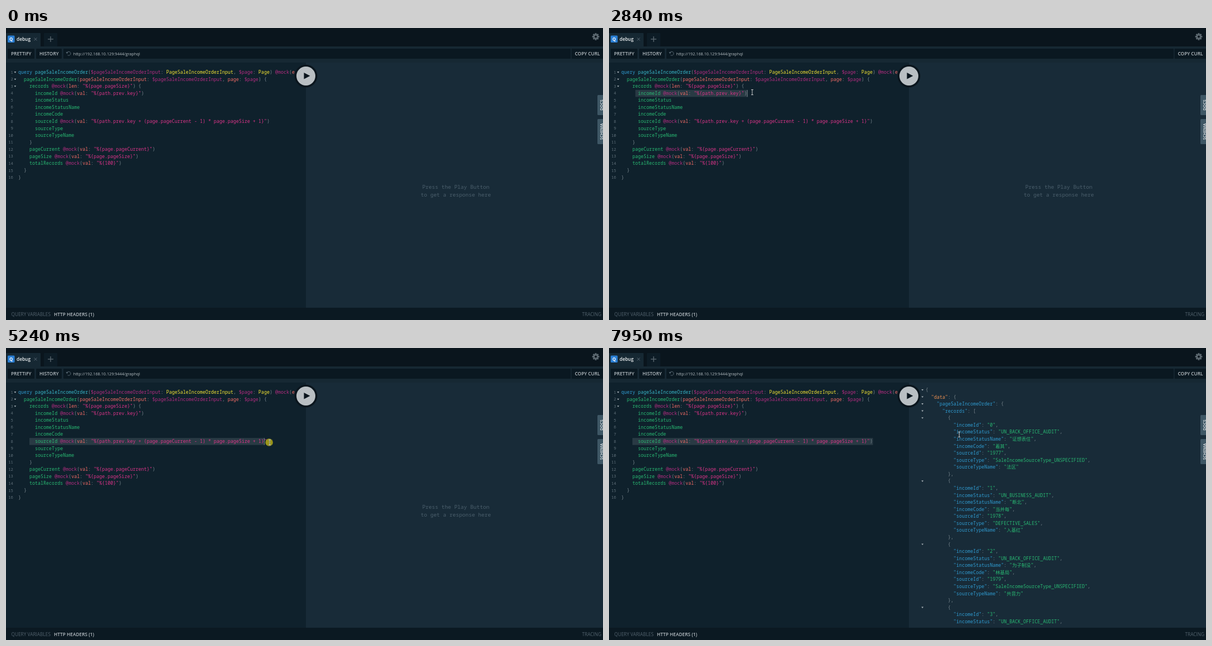
Recreate the animation shown at these times as an HTML page with a canvas. Size 1071 by 523 pixels, loop 8 s.

```html
<!DOCTYPE html>
<html lang="en">
<head>
<meta charset="utf-8">
<title>Query playground</title>
<style>
html, body { margin: 0; width: 100%; height: 100%; overflow: hidden; background: #0a151d; }
canvas { display: block; width: 1071px; height: 523px; }
</style>
</head>
<body>
<canvas id="stage" width="1071" height="523"></canvas>
<script>
const ctx = document.getElementById('stage').getContext('2d');
const LOOP = 8000, STEP = 67.9, START = 130;
const ROW = 12.57, COL = 5.01, CODE_SIZE = 8.35, UI_SIZE = 8.3;
const CLICK_PLAY = 6190, LOADING = 6660, RESPONSE = 6860;
const MONO = '"Noto Sans Mono", "Noto Sans CJK SC", "Noto Sans CJK", monospace';
const SANS = '"Open Sans", sans-serif';
const C = {
  bar: '#0a151d', nav: '#162833', button: '#0a1821', editor: '#0f212c', result: '#182b38',
  label: '#b8c0c5', dim: '#53636e', icon: '#5b676f', hint: '#4b5f6c', select: '#293a44',
  punct: '#75838b', blue: '#2f9bd0', cyan: '#38b5c8', green: '#29b973', pink: '#dc3489',
  variable: '#b32d80', arg: '#f26b66', type: '#f4e534', orange: '#ee9152'
};

const queryLines = `query pageSaleIncomeOrder($pageSaleIncomeOrderInput: PageSaleIncomeOrderInput, $page: Page) @mock(e
  pageSaleIncomeOrder(pageSaleIncomeOrderInput: $pageSaleIncomeOrderInput, page: $page) {
    records @mock(len: "%{page.pageSize}") {
      incomeId @mock(val: "%{path.prev.key}")
      incomeStatus
      incomeStatusName
      incomeCode
      sourceId @mock(val: "%{path.prev.key + (page.pageCurrent - 1) * page.pageSize + 1}")
      sourceType
      sourceTypeName
    }
    pageCurrent @mock(val: "%{page.pageCurrent}")
    pageSize @mock(val: "%{page.pageSize}")
    totalRecords @mock(val: "%{100}")
  }
}`.split('\n');

const BACK = 'UN_BACK_OFFICE_AUDIT', PLAIN = 'SaleIncomeSourceType_UNSPECIFIED';
const records = [
  [BACK, '证想表住', '着其', PLAIN, '法区'],
  ['UN_BUSINESS_AUDIT', '断北', '当并每', 'DEFECTIVE_SALES', '入基红'],
  [BACK, '为子制没', '林基局', PLAIN, '共音力'],
  [BACK, '', '', PLAIN, '']
].map(([incomeStatus, incomeStatusName, incomeCode, sourceType, sourceTypeName], i) => ({
  incomeId: `${i}`, incomeStatus, incomeStatusName, incomeCode,
  sourceId: `${1977 + i}`, sourceType, sourceTypeName
}));
const resultLines = JSON.stringify({ data: { pageSaleIncomeOrder: { records } } }, null, 2)
  .split('\n').slice(0, 34);

const queryRules = [
  [/"[^"]*"/y, C.pink], [/\$\w+/y, C.variable], [/@\w+/y, C.variable],
  [/\w+(?=:)|e$/y, C.arg], [/query\b/y, C.blue], [/(?<=query )\w+/y, C.cyan],
  [/[A-Z]\w*/y, C.type], [/\w+/y, C.green], [/\s+|./y, C.punct]
];
const resultRules = [
  [/"data"/y, C.orange], [/"\w+"(?=:)/y, C.blue], [/"[^"]*"/y, C.green], [/\s+|./y, C.punct]
];

function tokenize(line, rules) {
  const tokens = [];
  for (let pos = 0; pos < line.length;) {
    for (const [pattern, color] of rules) {
      pattern.lastIndex = pos;
      const match = pattern.exec(line);
      if (!match) continue;
      tokens.push([match[0], color]);
      pos += match[0].length;
      break;
    }
  }
  return tokens;
}
const queryTokens = queryLines.map(line => tokenize(line, queryRules));
const resultTokens = resultLines.map(line => tokenize(line, resultRules));

function rect(x, y, w, h, color) {
  ctx.fillStyle = color;
  ctx.fillRect(x, y, w, h);
}
function box(x, y, w, h, color, radius = 1) {
  ctx.fillStyle = color;
  ctx.beginPath();
  ctx.roundRect(x, y, w, h, radius);
  ctx.fill();
}
function disc(x, y, r, color) {
  ctx.fillStyle = color;
  ctx.beginPath();
  ctx.arc(x, y, r, 0, Math.PI * 2);
  ctx.fill();
}
// An isosceles triangle around a point; angle 0 points right.
function triangle(x, y, length, height, color, angle = 0) {
  ctx.save();
  ctx.translate(x, y);
  ctx.rotate(angle);
  ctx.fillStyle = color;
  ctx.beginPath();
  ctx.moveTo(length / 2, 0);
  ctx.lineTo(-length / 2, height / 2);
  ctx.lineTo(-length / 2, -height / 2);
  ctx.fill();
  ctx.restore();
}
function cross(x, y, size, color, width, angle = 0) {
  ctx.save();
  ctx.translate(x, y);
  ctx.rotate(angle);
  rect(-size / 2, -width / 2, size, width, color);
  rect(-width / 2, -size / 2, width, size, color);
  ctx.restore();
}

// Laid out at ten times the size, so small type keeps fractional advances.
function text(s, x, y, color, size = UI_SIZE, { family = SANS, weight = 400, align = 'left' } = {}) {
  ctx.save();
  ctx.translate(x, y);
  ctx.scale(0.1, 0.1);
  ctx.font = `${weight} ${size * 10}px ${family}`;
  ctx.textAlign = align;
  ctx.fillStyle = color;
  ctx.fillText(s, 0, 0);
  const width = ctx.measureText(s).width / 10;
  ctx.restore();
  return width;
}
function code(lines, x, y) {
  lines.forEach((tokens, row) => {
    let at = x;
    for (const [s, color] of tokens)
      at += text(s, at, y + row * ROW, color, CODE_SIZE, { family: MONO });
  });
}
function folds(lines, x, y) {
  lines.forEach((line, row) => {
    if (/[{[(e]$/.test(line)) triangle(x, y + row * ROW, 2.6, 3.8, '#a5afb5', Math.PI / 2);
  });
}

function button(label, x, w) {
  box(x, 37, w, 18, C.button);
  text(label, x + 6, 49, C.label, UI_SIZE, { weight: 600 });
}
function gear(x, y) {
  for (let i = 0; i < 4; i++) cross(x, y, 12.4, C.icon, 2.6, i * Math.PI / 4);
  disc(x, y, 4.7, C.icon);
  disc(x, y, 2, C.bar);
}
function sideTab(label, y, h) {
  box(1061, y, 12, h, '#3e5765', 1.5);
  ctx.save();
  ctx.translate(1071, y + h / 2);
  ctx.rotate(-Math.PI / 2);
  text(label, 0, 0, '#e4e9eb', 7.2, { weight: 600, align: 'center' });
  ctx.restore();
}

function drawChrome() {
  rect(0, 0, 1071, 523, C.bar);
  box(0, 9, 62, 26, C.nav);
  box(68, 9, 24, 24, '#0d1c26');
  rect(0, 33, 1071, 29, C.nav);
  box(3, 13.5, 12.5, 12.5, '#2a7ed3', 1.5);
  text('Q', 9.2, 22.6, '#fff', 8, { weight: 700, align: 'center' });
  text('debug', 19, 23, '#f0f3f4', UI_SIZE, { weight: 600 });
  cross(53, 20, 7, C.dim, 0.9, Math.PI / 4);
  cross(80, 20, 10, C.icon, 1.4);
  gear(1058, 15.5);

  button('PRETTIFY', 3, 48);
  button('HISTORY', 54, 46);
  button('', 103, 910);
  button('COPY CURL', 1014.5, 60);
  text('http://192.168.10.129:9444/graphql', 120.7, 48.7, '#b5bec3', 7.25);
  ctx.strokeStyle = C.dim;
  ctx.lineWidth = 1;
  ctx.beginPath();
  ctx.arc(112.5, 45.7, 3.5, -2.7, 2.2);
  ctx.stroke();
  triangle(109.5, 44.7, 3.5, 4, C.dim, Math.PI / 2);

  rect(0, 62, 538, 439, C.editor);
  rect(538, 62, 533, 439, C.result);
  rect(0, 501, 1071, 22, '#0b1922');
  text('QUERY VARIABLES', 9.5, 516, C.dim);
  text('HTTP HEADERS (1)', 86, 516, C.label, UI_SIZE, { weight: 600 });
  text('TRACING', 1033.5, 516, C.dim);
}

function drawPlay(loading) {
  disc(538, 86, 20.5, C.bar);
  disc(538, 86, 17, '#b9bfc3');
  if (loading) rect(533, 80.5, 10.5, 10.5, C.bar);
  else triangle(540, 85.7, 11, 11.4, C.bar);
}

// Each move eases from wherever the pointer rests to a new place.
const moves = [
  { from: START, to: 950, x: 22, y: 113 },
  { from: 1150, to: 1450, x: 50, y: 115 },
  { from: 1480, to: 2510, x: 257, y: 115 },
  { from: 2840, to: 3520, x: 41, y: 163 },
  { from: 4000, to: 5010, x: 465, y: 169 },
  { from: 5010, to: 5570, x: 490, y: 169 },
  { from: 5640, to: 5990, x: 541, y: 98 },
  { from: RESPONSE, to: 7600, x: 488, y: 128 },
  { from: 7670, to: 7950, x: 629, y: 155 }
];
const smooth = k => k * k * (3 - 2 * k);

function pointerAt(time) {
  const t = START + Math.floor((time - START) / STEP + 0.1) * STEP;
  let x = 963, y = 502;
  for (const move of moves) {
    const k = smooth(Math.min(1, Math.max(0, (t - move.from) / (move.to - move.from))));
    x += (move.x - x) * k;
    y += (move.y - y) * k;
  }
  return { x, y };
}

function drawBeam(x, y) {
  for (const [color, grow] of [['rgba(0,0,0,.4)', 0.5], ['#cbd2d5', 0]]) {
    const w = 1 + grow;
    rect(x - w / 2, y - 4.5, w, 9, color);
    for (const end of [-4.6, 4.6]) rect(x - 2 - grow, y + end - w / 2, 4 + 2 * grow, w, color);
  }
}
function drawHand(x, y) {
  for (const [color, grow] of [['#111', 0.8], ['#fff', 0]]) {
    const part = (dx, dy, w, h) =>
      box(x + dx - grow, y + dy - grow, w + 2 * grow, h + 2 * grow, color, 1 + grow);
    part(-2.5, -5.5, 2, 9);
    part(-2.5, -1.5, 6.3, 7.5);
    part(-4.5, 0.5, 3, 3);
  }
}
function drawPointer({ x, y }) {
  const overPlay = Math.hypot(x - 538, y - 86) < 18;
  (overPlay ? drawHand : drawBeam)(x, y);
}

const within = (t, from, to) => t >= from && t < to;

const drags = [
  { press: 1480, release: 2720, clear: 4000, blur: 3050, row: 3, start: 47.3, end: 247.7 },
  { press: 4000, release: 5640, clear: LOOP, blur: LOADING, row: 7, start: 42, end: 473.5 }
];
function drawSelection(t, pointer) {
  const drag = drags.find(d => within(t, d.press, d.clear));
  if (!drag) return;
  const { press, release, blur, row, start, end } = drag;
  const reach = start + Math.round((pointer.x - 9 - start) / COL) * COL;
  const edge = t < release ? Math.min(end, Math.max(start, reach)) : end;
  const top = 73.2 + row * ROW;
  rect(start, top, edge - start, 12.5, C.select);
  const blinkedOff = within(t, 5640, 6140);
  if (t < blur && !blinkedOff) rect(edge, top, 0.8, 12.5, '#99a3a8');
}

function drawQuery() {
  queryLines.forEach((_, i) =>
    text(i + 1, 12.8, 81.6 + i * ROW, '#60707a', 7.2, { family: MONO, align: 'right' }));
  folds(queryLines.slice(0, 3), 16.4, 79.4);
  code(queryTokens, 22, 82);
}

function drawResult(t) {
  if (t >= RESPONSE) {
    folds(resultLines, 562.3, 75.2);
    code(resultTokens, 568, 78);
    return;
  }
  ['Press the Play Button', 'to get a response here'].forEach((line, i) =>
    text(line, 807, 288.3 + i * 13.3, C.hint, 9.55, { family: MONO, align: 'center' }));
}

function draw(t) {
  const pointer = pointerAt(t);
  drawChrome();
  drawSelection(t, pointer);
  drawQuery();
  drawResult(t);
  drawPlay(within(t, LOADING, RESPONSE));
  sideTab('DOCS', 120, 36);
  sideTab('SCHEMA', 163, 45);
  if (t < START) return;
  const pressed = drags.some(d => within(t, d.press, d.release)) || within(t, CLICK_PLAY, LOADING);
  if (pressed) disc(pointer.x - 1, pointer.y, 6.8, 'rgba(172,164,24,.88)');
  drawPointer(pointer);
}

const begin = performance.now();
function tick() {
  draw((performance.now() - begin) % LOOP);
  requestAnimationFrame(tick);
}
tick();
</script>
</body>
</html>
```
